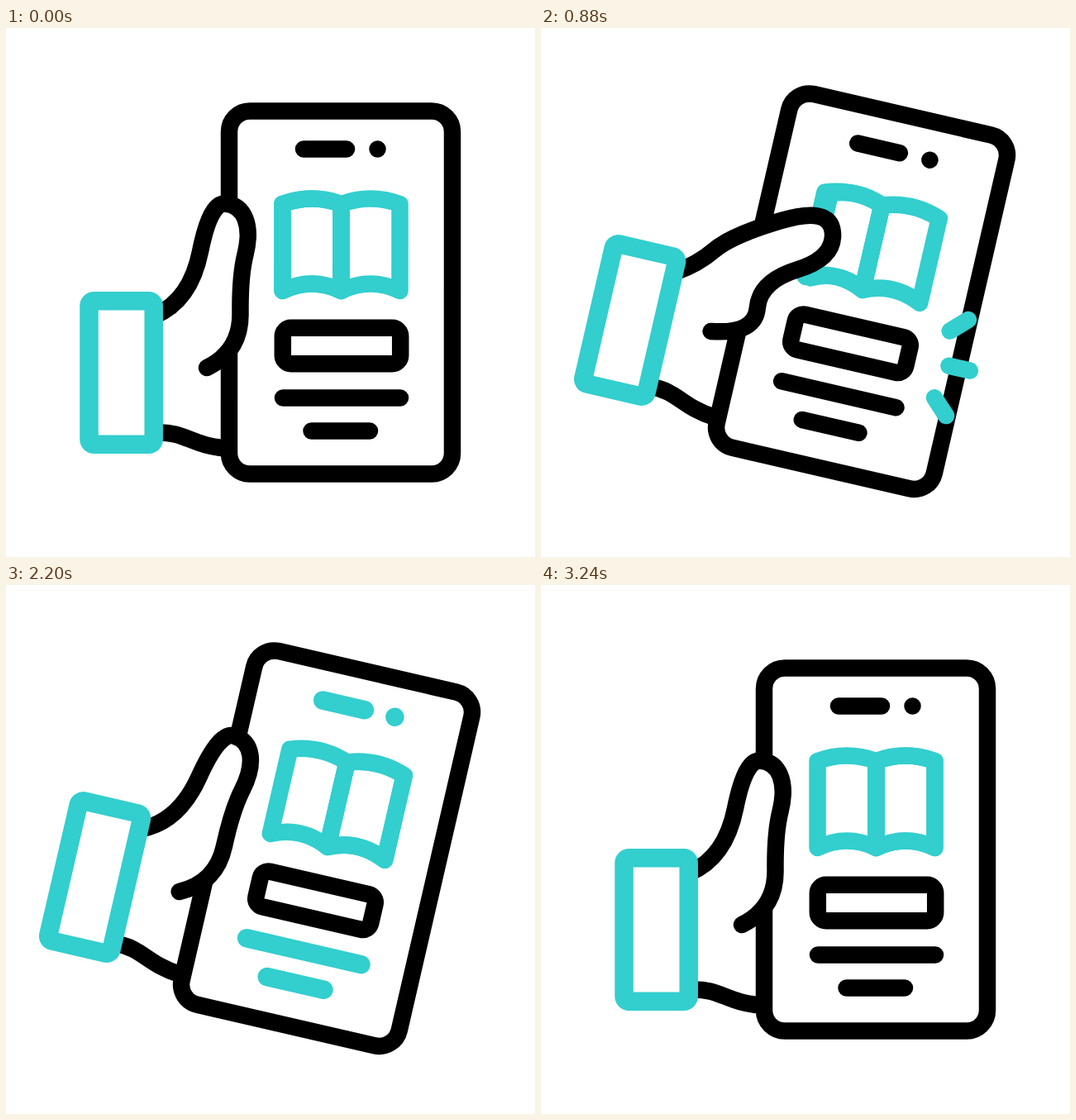
An HTML page for the animation above (3.3 s loop, 640 by 640 pixels).

```html
<!DOCTYPE html>
<html lang="en">
<head>
<meta charset="utf-8">
<title>Reading on a phone</title>
<style>
  html, body { margin: 0; width: 100%; height: 100%; overflow: hidden; background: #fff; }
  svg { display: block; width: 100vw; height: 100vh; }
  .ink, .teal { fill: none; stroke-width: 20.5; stroke-linecap: round; stroke-linejoin: round; }
  .ink { stroke: #000; }
  .teal { stroke: #33cece; }
  .solid { fill: #fff; }
</style>
</head>
<body>
<svg viewBox="0 0 640 640">
  <g id="scene">
    <rect class="ink" x="270" y="100.5" width="270" height="439" rx="25"/>
    <path id="blink" class="ink" d="M360 146.5H412M449.5 146.5h.01M335 447.5H477M369.5 487.5H440"/>
    <path id="leftPage" class="teal"/>
    <path id="rightPage" class="teal"/>
    <path id="turningPage" class="teal"/>
    <rect id="button" class="ink" x="334.8" y="362.7" width="142.4" height="43.6" rx="10"/>
    <path id="thumb" class="ink solid"/>
    <path class="ink" d="M182 489.5C216 488 224 505 266 508.5"/>
    <rect class="teal solid" x="100.5" y="330.2" width="78.2" height="173.6" rx="6" style="stroke-width:22.5"/>
    <path class="teal spark"/>
    <path class="teal spark"/>
    <path class="teal spark"/>
  </g>
</svg>
<script>
const LOOP = 3300;
const $ = id => document.getElementById(id);
const sparks = document.querySelectorAll('.spark');

const ramp = (t, a, b) => Math.min(1, Math.max(0, (t - a) / (b - a)));
const ease = (t, a, b) => (1 - Math.cos(Math.PI * ramp(t, a, b))) / 2;
const mix = (a, b, k) => a + (b - a) * k;
const mixPoint = (p, q, k) => [mix(p[0], q[0], k), mix(p[1], q[1], k)];

// Control points: cuff, knuckle, thumb back, two at the tip, inner bend, palm, crease.
const CUFF = [180, 348];
const REST = [CUFF, [223, 330], [247, 211], [283, 214], [296, 248], [283, 300], [284, 391], [243, 411]];
const LIFTED = [CUFF, [204, 333], [236, 290], [345, 228], [365, 288], [282, 336], [291, 400], [238, 408]];
const PRESSED = [CUFF, [212, 320], [250, 293], [397, 331], [401, 376], [280, 352], [293, 419], [231, 403]];

// Rounds a control polygon by joining the midpoints of its sides.
function smooth(points) {
  const last = points.length - 1;
  let d = `M${points[0]}`;
  for (let i = 1; i < last; i++) {
    const end = i === last - 1 ? points[last] : mixPoint(points[i], points[i + 1], 0.5);
    d += `Q${points[i]} ${end}`;
  }
  return d;
}

// pose: 0 rest, 1 lifted, 2 pressed
function thumbPath(pose) {
  const [from, to, k] = pose < 1 ? [REST, LIFTED, pose] : [LIFTED, PRESSED, pose - 1];
  return smooth(from.map((p, i) => mixPoint(p, to[i], k)));
}

// side: -1 lies left of the spine, 1 lies right
function pagePath(side) {
  const spine = 405.5, mid = spine + 35.5 * side, edge = spine + 71 * side;
  return `M${spine} 213Q${mid} 200 ${edge} 213V318Q${mid} 301 ${spine} 318Z`;
}

function drawSparks(t) {
  const start = mix(-13, 13, ease(t, 900, 1060));
  const end = mix(-13, 13, ease(t, 700, 860));
  sparks.forEach((spark, i) => {
    const side = i - 1;
    spark.setAttribute('transform',
      `translate(${541 - 12 * side * side} ${384 + 50.5 * side}) rotate(${44 * side})`);
    spark.setAttribute('d', end > start ? `M${start} 0H${end}` : '');
  });
}

function draw(t) {
  const tilt = ease(t, 0, 540) - ease(t, 2800, 3200);
  $('scene').setAttribute('transform',
    `translate(${-32 * tilt} ${-63.5 * tilt}) rotate(${13 * tilt} 139.5 417)`);

  $('thumb').setAttribute('d', thumbPath(2 * (ease(t, 0, 540) - ease(t, 640, 1120))));

  const push = ease(t, 400, 540) - ease(t, 600, 760);
  $('button').setAttribute('transform',
    `translate(406 384.5) scale(${1 - 0.12 * push}) translate(-406 -384.5)`);
  $('button').style.strokeWidth = 20.5 - 2.3 * push;

  $('turningPage').setAttribute('d', pagePath(mix(-1, 1, ease(t, 760, 1620))));
  drawSparks(t);

  const lit = t >= 1400 && t < 2400 && Math.floor(t / 200) % 2 === 1;
  $('blink').setAttribute('class', lit ? 'teal' : 'ink');
  $('blink').style.strokeWidth = lit ? 22.5 : 20.5;
}

$('leftPage').setAttribute('d', pagePath(-1));
$('rightPage').setAttribute('d', pagePath(1));

const begin = performance.now();
function frame() {
  draw((performance.now() - begin) % LOOP);
  requestAnimationFrame(frame);
}
frame();
</script>
</body>
</html>
```
